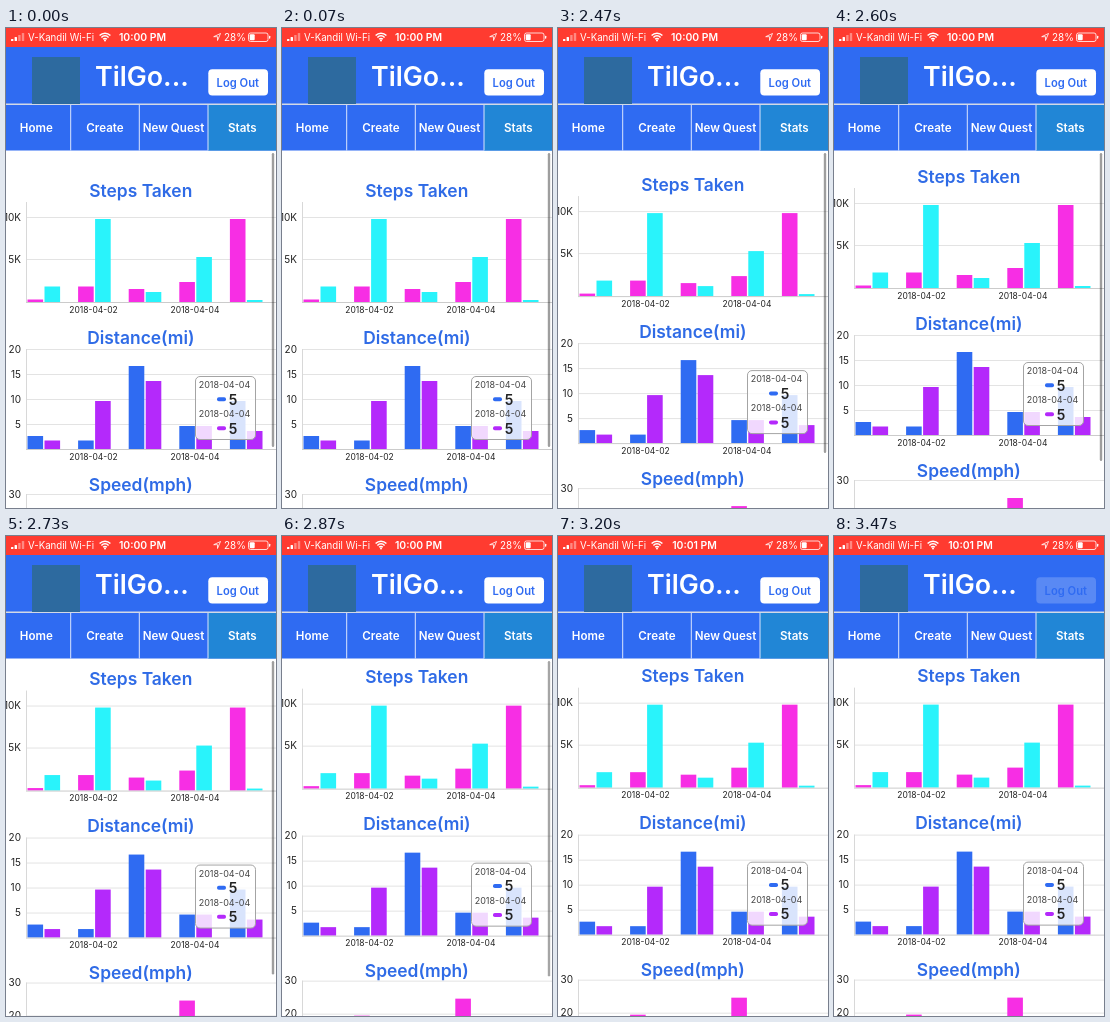
Recreate the animation shown at these times as an HTML page. Size 270 by 480 pixels, loop 3.54 s.

```html
<!DOCTYPE html>
<html lang="en">
<head>
<meta charset="utf-8">
<title>Stats screen</title>
<style>
  html, body { margin: 0; width: 100%; height: 100%; overflow: hidden; background: #fff; }
  svg { display: block; width: 100vw; height: 100vh; }
  text { font-family: Inter, "Liberation Sans", sans-serif; }
</style>
</head>
<body>
<svg id="stage" viewBox="0 0 270 480">
  <rect width="270" height="480" fill="#fff"/>
  <g id="content"></g>
  <rect id="scrollbar" x="265.8" y="125" width="2.4" rx="1.2" fill="#000" fill-opacity=".38"/>
  <g id="header"></g>
</svg>
<script>
const NS = 'http://www.w3.org/2000/svg';
const LOOP = 3540;
const STEP = 1000 / 15;
const BLUE = '#2f6bf2', PINK = '#f72ee4', CYAN = '#29f3fb', PURPLE = '#b429fb';
const content = document.getElementById('content');
const header = document.getElementById('header');
const scrollbar = document.getElementById('scrollbar');

function add(parent, tag, attrs) {
  const el = document.createElementNS(NS, tag);
  for (const key in attrs) el.setAttribute(key, attrs[key]);
  return parent.appendChild(el);
}
const rect = (parent, x, y, width, height, fill, more) =>
  add(parent, 'rect', { x, y, width, height, fill, ...more });
const line = (parent, x1, y1, x2, y2, stroke, width = 1) =>
  add(parent, 'line', { x1, y1, x2, y2, stroke, 'stroke-width': width });
function label(parent, str, x, y, size, fill, weight = 400, anchor = 'middle') {
  const el = add(parent, 'text', {
    x, y, fill, 'font-size': size, 'font-weight': weight, 'text-anchor': anchor
  });
  el.textContent = str;
  return el;
}

// ticks: [text, y]; each series holds bar heights in pixels
function chart({ title, titleY, top, base, ticks, series }) {
  label(content, title, 134.8, titleY, 17.4, '#2f6be6', 600);
  for (const [text, y] of ticks) {
    line(content, 20, y + .5, 270, y + .5, '#e3e3e3');
    label(content, text, 15, y + 3.5, 10, '#222', 400, 'end');
  }
  line(content, 20.5, top, 20.5, base, '#d8d8d8');
  series.forEach(([color, heights], s) => heights.forEach((h, i) =>
    rect(content, 21.5 + 50.6 * i + 17 * s, base - h, 15.6, h, color)));
  line(content, 20, base + .5, 270, base + .5, '#cbcbcb');
  label(content, '2018-04-02', 87.5, base + 10.5, 8.5, '#222');
  label(content, '2018-04-04', 189, base + 10.5, 8.5, '#222');
}

function buildContent() {
  chart({
    title: 'Steps Taken', titleY: 168.7, top: 174, base: 274,
    ticks: [['10K', 189], ['5K', 231]],
    series: [[PINK, [2.5, 15.5, 13, 20, 83]], [CYAN, [15.5, 83, 10, 45, 2]]]
  });
  chart({
    title: 'Distance(mi)', titleY: 315.7, top: 321, base: 421,
    ticks: [['20', 321], ['15', 346], ['10', 371], ['5', 396]],
    series: [[BLUE, [13, 8.5, 83, 23, 48]], [PURPLE, [8.5, 48, 68, 23, 18]]]
  });
  chart({
    title: 'Speed(mph)', titleY: 462.7, top: 466, base: 566,
    ticks: [['30', 466], ['20', 499], ['10', 532]],
    series: [[CYAN, [50, 50, 55, 50, 45]], [PINK, [50, 65, 55, 82, 50]]]
      .map(([color, heights]) => [color, heights]).reverse()
  });
  rect(content, 189.5, 348.5, 60, 63, '#fff', {
    rx: 4.5, 'fill-opacity': .82, stroke: '#a4a4a4', 'stroke-width': 1
  });
  [[357, BLUE], [386, PURPLE]].forEach(([y, color]) => {
    label(content, '2018-04-04', 218.5, y + 3.3, 9, '#444');
    rect(content, 211, y + 12.3, 9, 4, color, { rx: 1.8 });
    label(content, '5', 227, y + 19.5, 14, '#222', 600);
  });
}

function buildHeader() {
  rect(header, 0, 0, 270, 19, '#ff3b30');
  rect(header, 0, 19, 270, 103.5, BLUE);
  rect(header, 202, 77, 68, 45.5, '#2186d6');
  line(header, 0, 76.2, 270, 76.2, '#d3d9e6', 1.5);
  [64.7, 133.3, 202].forEach(x => line(header, x, 77, x, 122.5, '#dbe5fd'));

  // status bar
  for (let i = 0; i < 4; i++)
    rect(header, 5 + 3.6 * i, 11 - 2 * i, 2.4, 2 + 2 * i, '#fff', { rx: .5, opacity: i < 2 ? 1 : .4 });
  label(header, 'V-Kandil Wi-Fi', 22, 12.6, 9.7, '#fff', 400, 'start');
  [2.5, 5, 7.5].forEach(r => {
    const d = r * .72;
    add(header, 'path', {
      d: `M${99 - d} ${13 - d}A${r} ${r} 0 0 1 ${99 + d} ${13 - d}`,
      fill: 'none', stroke: '#fff', 'stroke-width': 1.5
    });
  });
  add(header, 'circle', { cx: 99, cy: 12.4, r: 1, fill: '#fff' });
  const clock = label(header, '', 136.5, 12.8, 10.4, '#fff', 600);
  add(header, 'path', { d: 'M214.5 5.5L211.5 12.5V8.7H207.7Z', fill: 'none', stroke: '#fff', 'stroke-width': .8 });
  label(header, '28%', 229, 12.6, 9.9, '#fff');
  rect(header, 242.5, 5, 19.5, 8.5, 'none', { rx: 2, stroke: '#fff', 'stroke-width': .8 });
  rect(header, 243.7, 6.2, 5, 6.1, '#fff', { rx: 1 });
  rect(header, 263, 7.7, 1.3, 3, '#fff', { rx: .6 });

  // title bar
  rect(header, 26, 29, 48, 47, '#2d6a9f');
  label(header, 'TilGo...', 89, 57.8, 26.8, '#fff', 600, 'start');
  const button = add(header, 'g', {});
  rect(button, 202.3, 41.2, 59.7, 26.2, '#fff', { rx: 4 });
  label(button, 'Log Out', 231.8, 58.5, 11.2, BLUE, 600);

  [['Home', 30.3], ['Create', 99], ['New Quest', 167.5], ['Stats', 236.3]]
    .forEach(([text, x]) => label(header, text, x, 104, 11.6, '#fff', 600));
  return { clock, button };
}

const clamp01 = v => Math.min(1, Math.max(0, v));

// the overscrolled page springs back to rest
function scrollAt(t) {
  if (t < 2335) return 0;
  if (t < 2600) return 14 * ((t - 2330) / 270) ** 1.27;
  return 22.4 - 8.4 * Math.exp((2600 - t) / 128);
}

buildContent();
const { clock, button } = buildHeader();

function render(time) {
  const t = Math.floor((time % LOOP + 4) / STEP) * STEP;
  const scroll = scrollAt(t);
  content.setAttribute('transform', `translate(0 ${-scroll.toFixed(2)})`);
  // overscroll squeezes the bar; it fades once the page has settled
  scrollbar.setAttribute('height', 294 + scroll);
  scrollbar.setAttribute('opacity', 1 - clamp01((t - 2840) / 360));
  clock.textContent = t < 3190 ? '10:00 PM' : '10:01 PM';
  button.setAttribute('opacity', 1 - .8 * clamp01((t - 3370) / 95));
}

const start = performance.now();
function tick() {
  render(performance.now() - start);
  requestAnimationFrame(tick);
}
tick();
</script>
</body>
</html>
```
